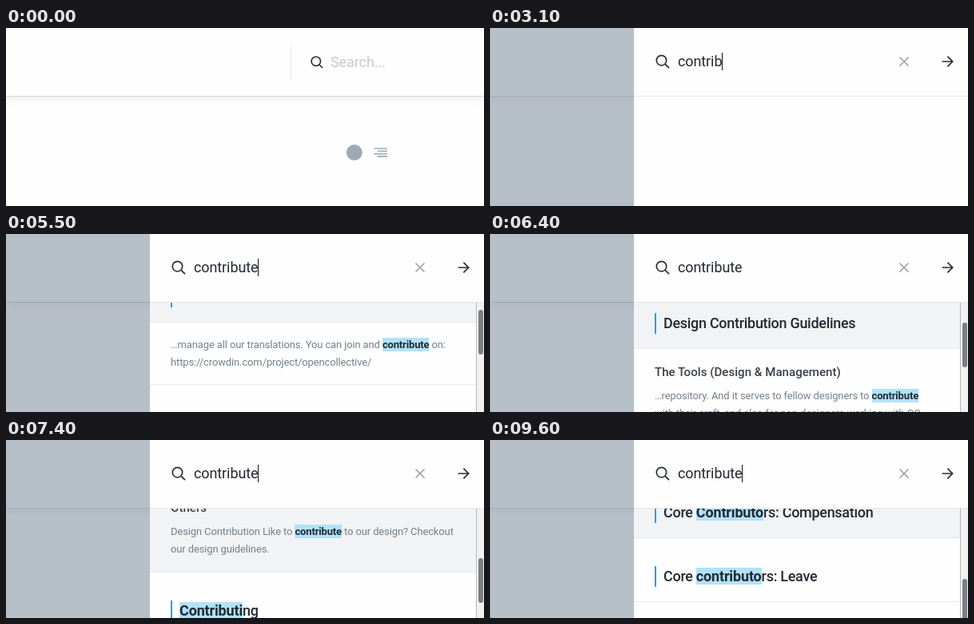
These frames come from a looping animation (598 by 223 pixels, 9.8 s). An HTML page:

```html
<!DOCTYPE html>
<html lang="en">
<head>
<meta charset="utf-8">
<title>Search panel</title>
<style>
  html, body { margin: 0; width: 100%; height: 100%; overflow: hidden; background: #fefefe; }
  body, #stage { font-family: Roboto, sans-serif; }
  #stage { position: relative; width: 598px; height: 223px; overflow: hidden; }
  #stage div, svg { position: absolute; box-sizing: border-box; }
  svg { left: 0; top: 0; overflow: visible; fill: none; }
  .bar { left: 0; top: 0; width: 100%; height: 86px; background: #fefefe; }
  #page .bar { border-bottom: 1px solid #d3d5d9; box-shadow: 0 3px 9px rgba(116, 129, 141, .15); }
  #panel .bar { border-bottom: 1px solid #e4e7eb; }
  .field { font-size: 18px; letter-spacing: -.1px; line-height: 22px; white-space: nowrap; color: #242a31; }
  .placeholder { color: #c6cad6; }
  #overlay { width: 100%; height: 100%; background: rgba(114, 130, 149, .5); }
  #panel { top: 0; width: 418px; height: 223px; background: #fefefe; }
  #query { left: 55px; top: 31px; height: 22px; }
  #caret { top: 0; left: 100%; width: 1px; height: 22px; background: #111; }
  #results { left: 0; top: 86px; width: 418px; height: 137px; overflow: hidden; }
  #list { left: 0; top: 0; width: 408px; }
  .item { left: 0; width: 100%; border-bottom: 1px solid #e6eaee; white-space: nowrap; }
  .item.hover { background: #f1f3f5; }
  .title { left: 26px; top: 35px; height: 26px; padding-left: 9px; border-left: 2px solid #18a0e6;
    font-size: 18px; font-weight: 500; letter-spacing: -.3px; line-height: 26px; color: #242a31; }
  .heading { left: 26px; top: 18px; font-size: 15.1px; font-weight: 500; line-height: 22px; color: #3b404a; }
  .snippet { left: 26px; font-size: 13px; letter-spacing: -.13px; line-height: 22px; color: #74818d; }
  mark { background: #b0e2fa; color: #242a31; font-weight: 700; letter-spacing: -.15px; }
  .snippet mark { padding: 1px 0; }
  #track { left: 408px; top: 0; width: 10px; height: 100%; background: #f1f1f2; border-left: 1px solid #b4b6b9; }
  #thumb { left: 2px; width: 6px; height: 56px; border-radius: 3px; background: #7b7f84; }
</style>
</head>
<body>
<div id="stage">
  <div id="page" style="width:100%;height:100%">
    <div class="bar"></div>
    <svg width="598" height="223">
      <path d="M356.5 21V66" stroke="#e6e8ee"/>
      <g stroke="#242a31" stroke-width="1.6"><circle cx="387.8" cy="41.7" r="5.7"/><path d="M392 46l4 4"/></g>
      <circle cx="435.8" cy="156" r="10" fill="#9daab6"/>
      <path d="M460.5 151H477M464.5 154.3H477M460.5 157.6H477M464.5 160.9H477" stroke="#9daab6" stroke-width="1.6"/>
    </svg>
    <div class="field placeholder" style="left:406px;top:32px">Search...</div>
  </div>
  <div id="overlay"></div>
  <div id="panel">
    <div class="bar"></div>
    <svg width="418" height="86" stroke="#2a2e35" stroke-width="1.7">
      <circle cx="34.5" cy="40.6" r="6.2"/><path d="M39 45.2l5 5"/>
      <path id="clear" d="M332.5 36.5l11 11m0-11l-11 11" stroke="#9aa3ad"/>
      <path d="M385.7 42H398.4M392.4 35.7l6.3 6.3-6.3 6.3"/>
    </svg>
    <div id="query" class="field"><span id="typed"></span><div id="caret"></div></div>
    <div id="results">
      <div id="list"></div>
      <div id="track"><div id="thumb"></div></div>
    </div>
  </div>
</div>
<script>
const LOOP = 9800, STEP = 100, POINTER_Y = 12, WORD = "contribute";
const $ = id => document.getElementById(id);

// [time, value] pairs, joined by straight lines
const opening = [[1100, 0], [1200, .4], [1300, .85], [1400, 1]];
const scrolling = [[5200, 0], [5500, 55], [6200, 165], [6300, 165], [6400, 180], [7000, 383], [7900, 600], [8200, 682]];
const keyTimes = [2500, 2600, 2800, 2900, 3000, 3100, 3100, 3200, 3300, 3500];

// Asterisks enclose highlighted text
const title = text => ({ height: 80, title: text });
const results = [
  title("Translations"),
  { height: 78, snippet: "…manage all our translations. You can join and *contribute* on:\nhttps://crowdin.com/project/opencollective/" },
  title("Design Contribution Guidelines"),
  { height: 131, heading: "The Tools (Design & Management)",
    snippet: "…repository. And it serves to fellow designers to *contribute*\nwith their craft, and also for non-designers working with OC\nto find the files they need." },
  title("*Contributi*on Guide"),
  { height: 110, heading: "Others",
    snippet: "Design Contribution Like to *contribute* to our design? Checkout\nour design guidelines." },
  title("*Contributi*ng"),
  title("Core *Contributo*rs: Compensation"),
  title("Core *contributo*rs: Leave"),
  title("*Contributi*ng Docs")
];

const format = text => text.replace("&", "&amp;").replace(/\*(.+?)\*/g, "<mark>$1</mark>").replace(/\n/g, "<br>");

let nextTop = 0;
for (const item of results) {
  item.top = nextTop;
  nextTop += item.height;
  item.el = document.createElement("div");
  item.el.style.cssText = `top:${item.top}px;height:${item.height}px`;
  for (const part of ["title", "heading", "snippet"]) {
    if (!item[part]) continue;
    const el = document.createElement("div");
    el.className = part;
    el.innerHTML = format(item[part]);
    if (part === "snippet") el.style.top = (item.heading ? 48 : 17) + "px";
    item.el.append(el);
  }
  $("list").append(item.el);
}

function valueAt(keys, t) {
  const i = keys.findIndex(key => t < key[0]);
  if (i === 0) return keys[0][1];
  if (i < 0) return keys[keys.length - 1][1];
  const [t0, a] = keys[i - 1], [t1, b] = keys[i];
  return a + (b - a) * (t - t0) / (t1 - t0);
}

const show = (id, visible) => $(id).style.visibility = visible ? "visible" : "hidden";

function render(t) {
  const open = valueAt(opening, t);
  $("overlay").style.opacity = open;
  $("panel").style.left = Math.round(598 - 418 * open) + "px";

  const count = keyTimes.filter(time => time <= t).length;
  $("typed").textContent = count ? WORD.slice(0, count) : "Search...";
  $("typed").className = count ? "" : "placeholder";
  $("caret").style.left = count ? "100%" : "0";
  show("caret", t >= 2400 && Math.floor(t / 1200) % 2 === 0);
  show("clear", count > 0);

  const scroll = Math.round(valueAt(scrolling, t));
  show("results", t >= 3700);
  $("list").style.top = -scroll + "px";
  $("thumb").style.top = 3 + Math.floor(scroll / 8) + "px";
  const pointer = POINTER_Y + scroll;
  for (const { el, top, height } of results) {
    const hovered = t >= 3800 && pointer >= top && pointer < top + height;
    el.className = hovered ? "item hover" : "item";
  }
}

function tick() {
  render(Math.floor(performance.now() % LOOP / STEP) * STEP);
  requestAnimationFrame(tick);
}
tick();
</script>
</body>
</html>
```
